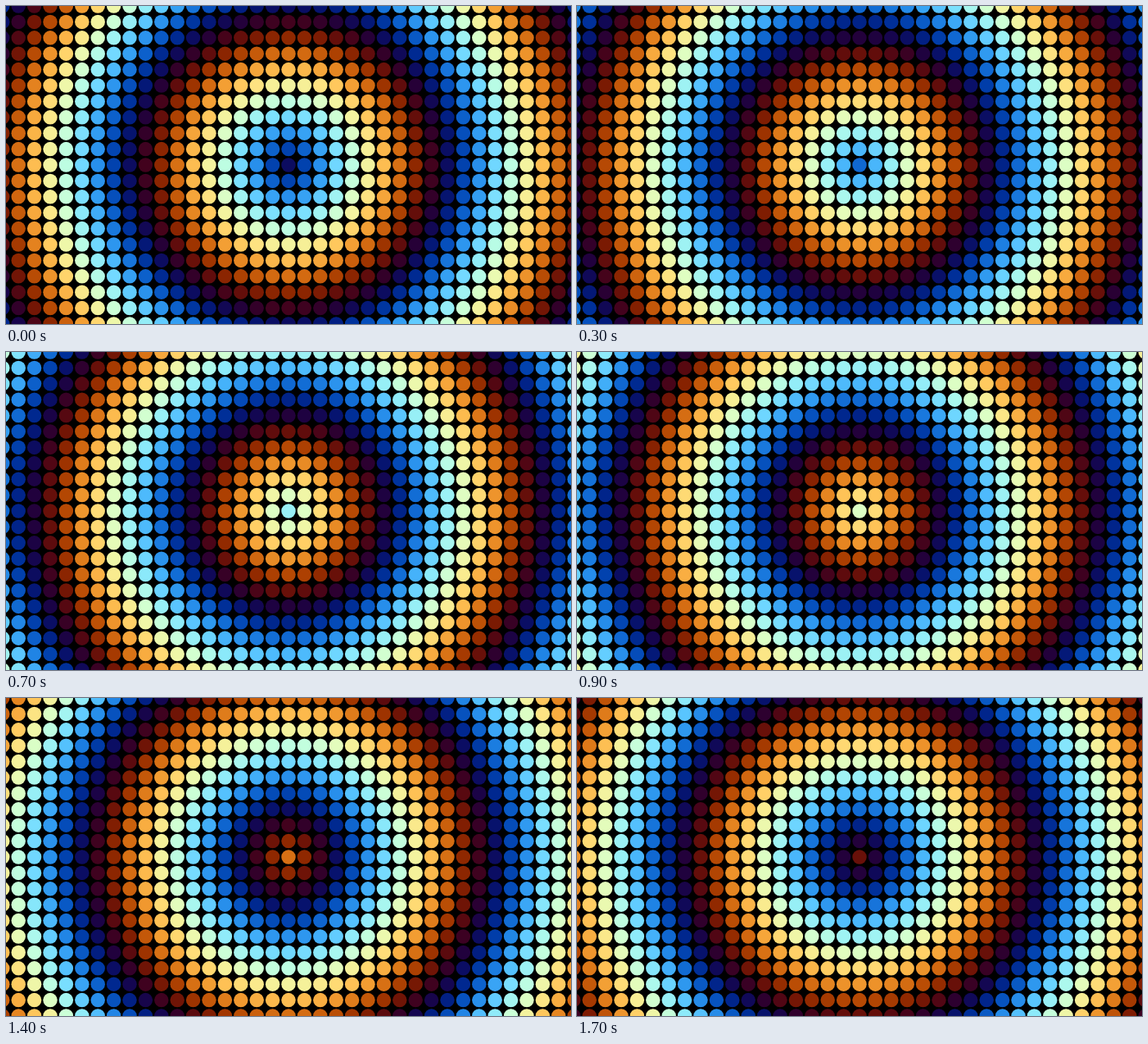
Write an HTML page with a canvas that moves like this. It is 690 by 388 pixels and loops after 1.8 s.

```html
<!DOCTYPE html>
<html lang="en">
<head>
<meta charset="utf-8">
<title>Dot ripples</title>
<style>
  html, body { margin: 0; width: 100%; height: 100%; overflow: hidden; background: #000; }
  canvas { display: block; }
</style>
</head>
<body>
<canvas id="stage" width="690" height="388"></canvas>
<script>
const canvas = document.getElementById('stage');
const ctx = canvas.getContext('2d');
const { width, height } = canvas;

const LOOP_MS = 1800;
const STEP_MS = 100;
const PITCH = height / 20;
const RADIUS = PITCH * 0.45;
const PERIOD = 10;          // ring spacing, in cells
const SHIFT = 0.5;          // inward travel per step, in cells
const PEAKS = [5.7, 4.3, 2.9]; // where red, green and blue are brightest

const wave = x => 0.5 + 0.5 * Math.cos(2 * Math.PI * x / PERIOD);

function colorAt(phase) {
  const [r, g, b] = PEAKS.map(peak => Math.round(255 * wave(phase - peak)));
  return `rgb(${r},${g},${b})`;
}

function draw(step) {
  const cols = Math.ceil(width / 2 / PITCH);
  const rows = Math.ceil(height / 2 / PITCH);
  ctx.fillStyle = '#000';
  ctx.fillRect(0, 0, width, height);
  for (let row = -rows; row <= rows; row++) {
    for (let col = -cols; col <= cols; col++) {
      ctx.fillStyle = colorAt(Math.hypot(col, row) + step * SHIFT);
      ctx.beginPath();
      ctx.arc(width / 2 + col * PITCH, height / 2 + row * PITCH, RADIUS, 0, 2 * Math.PI);
      ctx.fill();
    }
  }
}

function tick() {
  draw(Math.floor(performance.now() % LOOP_MS / STEP_MS));
  requestAnimationFrame(tick);
}
tick();
</script>
</body>
</html>
```
